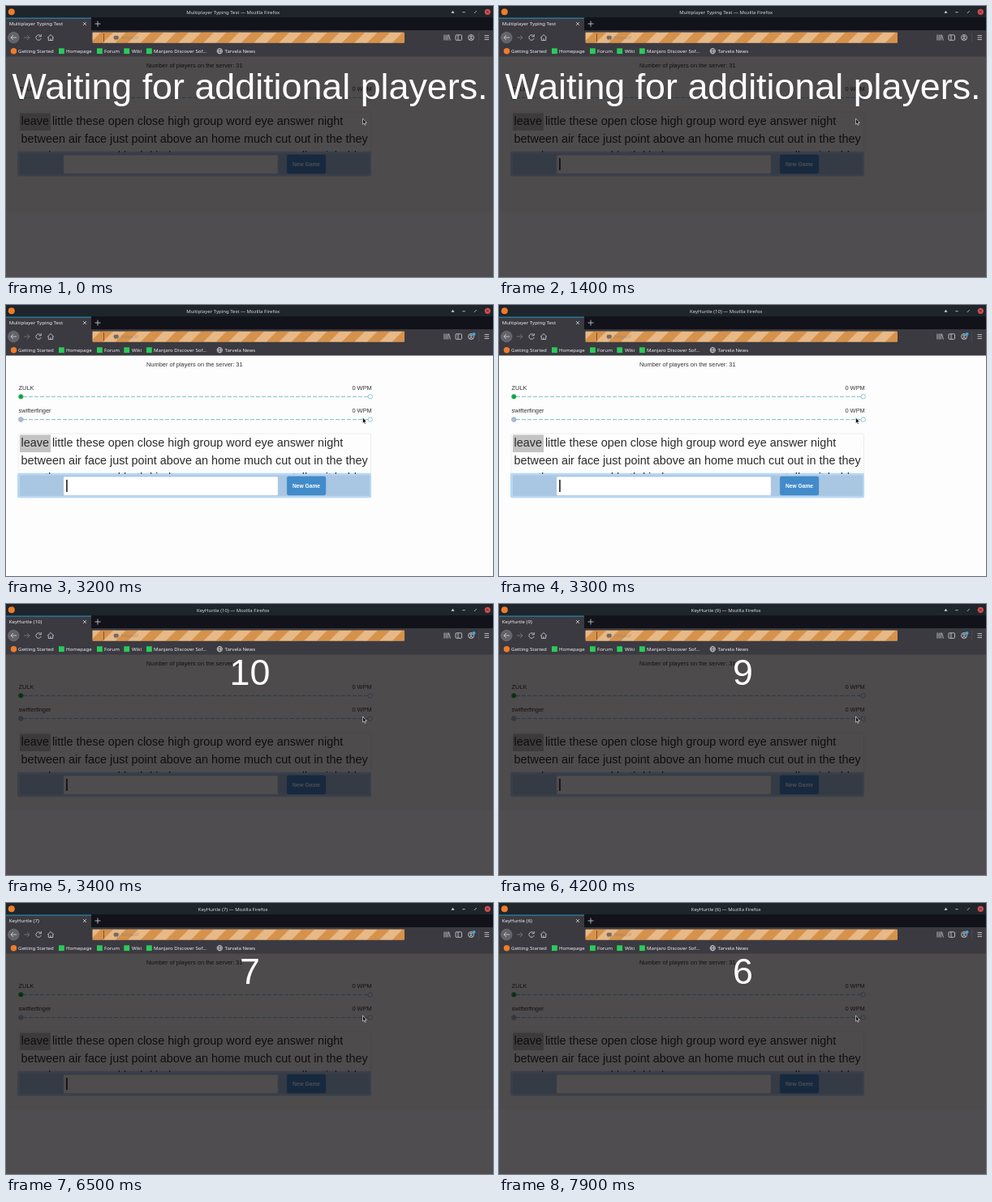
An HTML page for the animation above (8 s loop, 600x335 px).

```html
<!DOCTYPE html>
<html lang="en">
<head>
<meta charset="utf-8">
<title>Multiplayer Typing Test</title>
<style>
  html, body { margin: 0; width: 100%; height: 100%; overflow: hidden; background: #fff; }
  svg { display: block; width: 100vw; height: 100vh; }
  .ui { font: 6.1px "Noto Sans", sans-serif; fill: #eef0f1; }
  .title { font-size: 6px; text-anchor: middle; fill: #d6d9db; }
  .page { font: 7.45px "Liberation Sans", Arial, sans-serif; fill: #333; }
  .words { font-size: 14.4px; fill: #2b2b2b; }
  .big { font: 44.8px "Liberation Sans", Arial, sans-serif; fill: #fff; text-anchor: middle; }
  .icon { fill: none; stroke: #d3d6d8; stroke-width: .8; }
</style>
</head>
<body>
<svg viewBox="0 0 600 335" xmlns="http://www.w3.org/2000/svg">
  <defs>
    <pattern id="stripes" width="31" height="13.300" patternUnits="userSpaceOnUse" x="460" y="32.500">
      <rect width="31" height="13.300" fill="#d6924b"/>
      <path d="M0 13.300L13.300 0H28.800L15.500 13.300Z" fill="#e7b987"/>
    </pattern>
    <clipPath id="card"><rect x="15" y="131" width="435" height="49.700"/></clipPath>
    <g id="track">
      <path d="M21 113.300H446" stroke="#78bed0" stroke-width="1" stroke-dasharray="5 2"/>
      <circle cx="448.700" cy="113.300" r="2.700" fill="#fff" stroke="#84bbdc" stroke-width=".9"/>
    </g>
  </defs>

  <rect width="600" height="335" fill="#fdfdfd"/>
  <g class="page">
    <text id="count" x="173" y="75.700"></text>
    <use href="#track"/>
    <circle cx="18.300" cy="113.300" r="3" fill="#19b34a"/>
    <path d="M18.300 111.500V115" stroke="#0c7430" stroke-width=".8"/>
    <text x="15.500" y="105">ZULK</text>
    <text x="450.800" y="105" text-anchor="end">0 WPM</text>
    <g id="rival">
      <use href="#track" y="28.300"/>
      <circle cx="18.300" cy="141.600" r="2.800" fill="#a9bfd2" stroke="#8ba5bb" stroke-width=".7"/>
      <text x="15.500" y="133.200">swifterfinger</text>
      <text x="450.800" y="133.200" text-anchor="end">0 WPM</text>
    </g>
    <g id="board">
      <rect x="15" y="131" width="434.500" height="60" rx="1.500" fill="#fdfdfd" stroke="#e6e6e6" stroke-width=".7"/>
      <rect x="17" y="132.500" width="38" height="21.500" fill="#c3c3c3"/>
      <g class="words">
        <text x="18.500" y="147">leave little these open close high group word eye answer night</text>
        <text x="18.500" y="168.600">between air face just point above an home much cut out in the they</text>
      </g>
      <rect x="14" y="179.700" width="436" height="30.800" rx="2" fill="#b7d8f5"/>
      <g class="words" clip-path="url(#card)">
        <text x="18.500" y="190.200">saw then room and both kind men was run no some tell wait hold</text>
      </g>
      <rect x="17" y="182.500" width="431" height="25.500" fill="#a9c6e2"/>
      <rect x="71" y="184.300" width="264" height="23" rx="1" fill="#fff" stroke="#c8d2dc" stroke-width=".5"/>
      <rect id="caret" x="74.200" y="188" width="1.500" height="15" fill="#111"/>
      <rect x="346.300" y="184" width="47.500" height="23" rx="2" fill="#428bca" stroke="#357ebd" stroke-width=".5"/>
      <text x="370" y="197.700" text-anchor="middle" style="font-size:6.700px;font-weight:bold;fill:#fff">New Game</text>
    </g>
  </g>

  <g id="overlay">
    <rect y="62" width="600" height="273" fill="#050104" fill-opacity=".7"/>
    <text id="message" class="big" x="300.500"></text>
  </g>
  <path d="M439.500 139V146.200L441 144.900L442 147.300L443.200 146.800L442.200 144.500H444.300Z" fill="#111" stroke="#f4f4f4" stroke-width=".6"/>

  <g class="ui">
    <rect width="600" height="62.500" fill="#3b3a41"/>
    <rect width="600" height="14.500" fill="#1e252b"/>
    <rect y="14" width="600" height="16" fill="#12131a"/>
    <rect y="14.500" width="105" height="15.500" fill="#3b3a41"/>
    <rect y="14.500" width="105" height="1.200" fill="#2685ad"/>
    <circle cx="6.800" cy="7.300" r="4" fill="#f07b28"/>
    <text id="title" class="title" x="279.700" y="9.600"></text>
    <text id="tab" x="3.800" y="24.200"></text>
    <g class="icon">
      <path d="M95 20L99 24M99 20L95 24M109.500 22H116.500M113 18.500V25.500"/>
      <path d="M562.300 7.700H565.700M576.800 9L579.800 6"/>
      <path d="M548.500 8.800L550.500 5.800L552.500 8.800Z" fill="#d3d6d8" stroke="none"/>
      <circle cx="593.300" cy="7.300" r="3.600" fill="#d84b50" stroke="none"/>
      <path d="M592 6L594.600 8.600M594.600 6L592 8.600" stroke="#2d3136"/>
      <circle cx="9.300" cy="39" r="6.800" fill="#63636a" stroke="#7b7b82" stroke-width=".6"/>
      <path d="M13 39H6M9 36L6 39L9 42"/>
      <path d="M22 39H29M26 36L29 39L26 42" stroke="#7c7c82"/>
      <path d="M42.600 37A3.200 3.200 0 1 0 43.200 40M43.300 35V37.800H40.500"/>
      <path d="M51 39.300L55 35.500L59 39.300M52.300 38.600V42.500H57.700V38.600M55 42.500V40"/>
      <path d="M540 35.500V42.500M542.200 35.500V42.500M544.300 35.500V42.500M545.600 35.700L547.300 42.500"/>
      <rect x="554" y="35.800" width="7.500" height="6.500" rx="1"/>
      <path d="M557 36V42"/>
      <circle cx="573" cy="39" r="3.500"/>
      <circle cx="573" cy="38" r="1.200"/>
      <path d="M570.700 41.500Q573 38.800 575.300 41.500"/>
      <path d="M582.500 33V45" stroke="#55545b" stroke-width=".6"/>
      <path d="M589.500 36.500H595M589.500 39H595M589.500 41.500H595"/>
    </g>
    <circle id="badge" cx="576.500" cy="36" r="2" fill="#3ba8e0"/>
    <rect x="106.500" y="32.500" width="384.500" height="13.300" rx="1" fill="url(#stripes)"/>
    <path d="M120.500 34V44.500" stroke="#794a21" stroke-width=".9"/>
    <rect x="133" y="36.700" width="5.500" height="4.500" rx="1" fill="#756a63"/>
    <path d="M132 39H139.500M134.500 41V42.500M137 41V42.500" stroke="#756a63" stroke-width=".8"/>
    <text x="142" y="41.200" style="fill:#9c8771">https://</text>
    <circle cx="9.500" cy="55.700" r="3.700" fill="#f07b28"/>
    <g fill="#2bcb59">
      <rect x="65" y="52.300" width="6.800" height="6.800"/>
      <rect x="112" y="52.300" width="6.800" height="6.800"/>
      <rect x="145.300" y="52.300" width="6.800" height="6.800"/>
      <rect x="173" y="52.300" width="6.800" height="6.800"/>
    </g>
    <g class="icon" stroke-width=".7">
      <circle cx="263.300" cy="55.700" r="3.200"/>
      <ellipse cx="263.300" cy="55.700" rx="1.400" ry="3.200"/>
      <path d="M260.100 55.700H266.500"/>
    </g>
    <text x="15" y="57.900">Getting Started</text>
    <text x="74" y="57.900">Homepage</text>
    <text x="121" y="57.900">Forum</text>
    <text x="155" y="57.900">Wiki</text>
    <text x="182" y="57.900">Manjaro Discover Sof...</text>
    <text x="269.500" y="57.900">Tarvela News</text>
  </g>
</svg>
<script>
  const LOOP = 8000, BLINK = 1200;
  const JOINED = 3200, TITLED = 3300, COUNTDOWN = 3400;
  const el = id => document.getElementById(id);
  const show = (id, on) => el(id).setAttribute("visibility", on ? "visible" : "hidden");
  const write = (id, text) => {
    if (el(id).textContent !== text) el(id).textContent = text;
  };

  function render(t) {
    const joined = t >= JOINED;
    const counting = t >= COUNTDOWN;
    const seconds = 10 - Math.max(0, Math.floor((t - JOINED) / 1000));
    const waitingTitle = "Multiplayer Typing Test";
    const gameTitle = `KeyHurtle (${seconds})`;

    write("title", `${t >= TITLED ? gameTitle : waitingTitle} — Mozilla Firefox`);
    write("tab", counting ? gameTitle : waitingTitle);
    write("count", `Number of players on the server: ${t >= 3100 && !joined ? 30 : 31}`);
    write("message", counting ? String(seconds) : "Waiting for additional players.");
    el("message").setAttribute("y", counting ? 100 : 115);
    el("board").setAttribute("transform", `translate(0 ${joined ? 28 : 0})`);

    show("rival", joined);
    show("overlay", !joined || counting);
    show("badge", t >= 2600);
    show("caret", t >= 800 && Math.floor((t - 800) / BLINK) % 2 === 0);
  }

  const start = performance.now();
  function tick() {
    render((performance.now() - start) % LOOP);
    requestAnimationFrame(tick);
  }
  tick();
</script>
</body>
</html>
```
